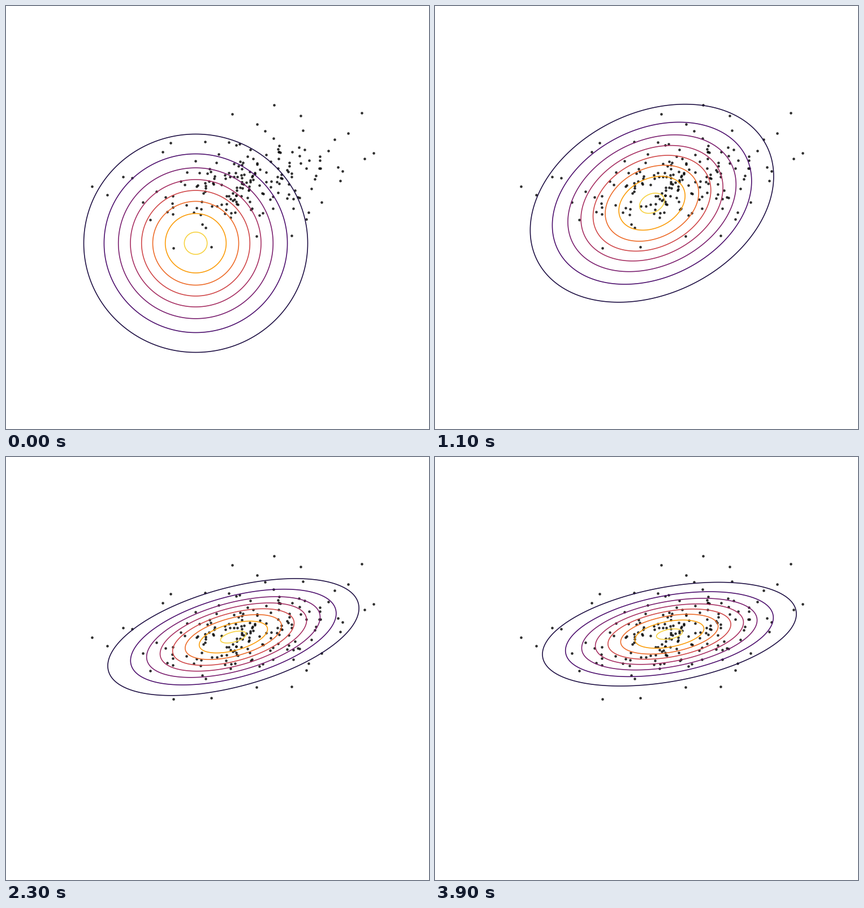
A matplotlib script that plays this animation: 748x748 px, repeating every 4000 ms.

```python
import numpy as np
import matplotlib.pyplot as plt
from matplotlib.animation import FuncAnimation
from matplotlib.collections import LineCollection

SIZE, DPI = 748, 88
PX = 72 / DPI  # points per pixel
FRAMES, INTERVAL = 40, 100

# Outlying points of the cloud, in pixels
OUTLIERS = np.reshape([
    474, 174, 400, 190, 521, 193, 629, 188, 444, 208, 458, 220, 525, 219,
    605, 224, 581, 235, 352, 239, 291, 241, 277, 257, 650, 259, 634, 269,
    394, 240, 595, 291, 591, 308, 558, 346, 535, 364, 531, 376, 505, 405,
    443, 406, 363, 425, 296, 427, 255, 377, 242, 346, 179, 333, 152, 318,
    207, 301, 223, 303,
], (-1, 2))


def inner_points(count):
    """Body of the cloud: a tilted Gaussian cut off at an ellipse."""
    rng = np.random.default_rng(4)
    u, v = rng.normal(0, 0.48, (2, 5 * count))
    inside = u**2 + v**2 < 1
    u, v = u[inside][:count], v[inside][:count]
    return np.column_stack([417 + 172 * u, 315 - 36 * u + 74 * v])


def smooth(knots, values, at):
    """Cubic Hermite interpolation with finite difference slopes."""
    slopes = np.gradient(values, knots, edge_order=2)
    i = np.clip(np.searchsorted(knots, at, side="right") - 1, 0, len(knots) - 2)
    h = knots[i + 1] - knots[i]
    s = (at - knots[i]) / h
    return ((1 + 2 * s) * (1 - s)**2 * values[i]
            + s * (1 - s)**2 * h * slopes[i]
            + s**2 * (3 - 2 * s) * values[i + 1]
            + s**2 * (s - 1) * h * slopes[i + 1])


# Bounds of the outermost ring and correlation of the fitted Gaussian
knots = np.array([0, 7, 12, 18, 24, 31, 39])
left, right, top, bottom, rho = (
    smooth(knots, np.array(v), np.arange(FRAMES)) for v in (
        [137, 159, 169.7, 177, 180, 185, 189.5],
        [533, 585, 601, 614, 625.3, 634, 638.5],
        [226, 178, 174, 194, 217.3, 220.5, 221],
        [612, 555, 515, 460, 416, 406.5, 404.5],
        [0, 0.208, 0.29, 0.43, 0.495, 0.407, 0.388],
    ))

# Evenly spaced density levels, as radii relative to the outermost ring
level = np.arange(1, 9)
radius = np.sqrt(-np.log(0.1223 * level))
radius /= radius[0]
angle = np.linspace(0, 2 * np.pi, 241)

fig = plt.figure(figsize=(SIZE / DPI, SIZE / DPI), dpi=DPI, facecolor="white")
ax = fig.add_axes([0, 0, 1, 1])
ax.set_xlim(0, SIZE)
ax.set_ylim(SIZE, 0)
ax.axis("off")

points = np.vstack([OUTLIERS, inner_points(165)]) + 0.5
ax.scatter(points[:, 0], points[:, 1], s=10 * PX**2, color="black",
           alpha=0.7, linewidths=1.5 * PX, zorder=1)
rings = LineCollection([], colors=plt.get_cmap("inferno")(level / 9),
                       linewidths=1.6 * PX, zorder=2)
ax.add_collection(rings, autolim=False)


def update(n):
    cx, cy = (left[n] + right[n]) / 2, (top[n] + bottom[n]) / 2
    x = (right[n] - left[n]) / 2 * np.cos(angle)
    y = -(bottom[n] - top[n]) / 2 * (
        rho[n] * np.cos(angle) + np.sqrt(1 - rho[n]**2) * np.sin(angle))
    rings.set_segments([np.column_stack([cx + r * x, cy + r * y]) + 0.5
                        for r in radius])
    return [rings]


anim = FuncAnimation(fig, update, frames=FRAMES, interval=INTERVAL,
                     repeat=True, repeat_delay=0)
plt.show()
```
